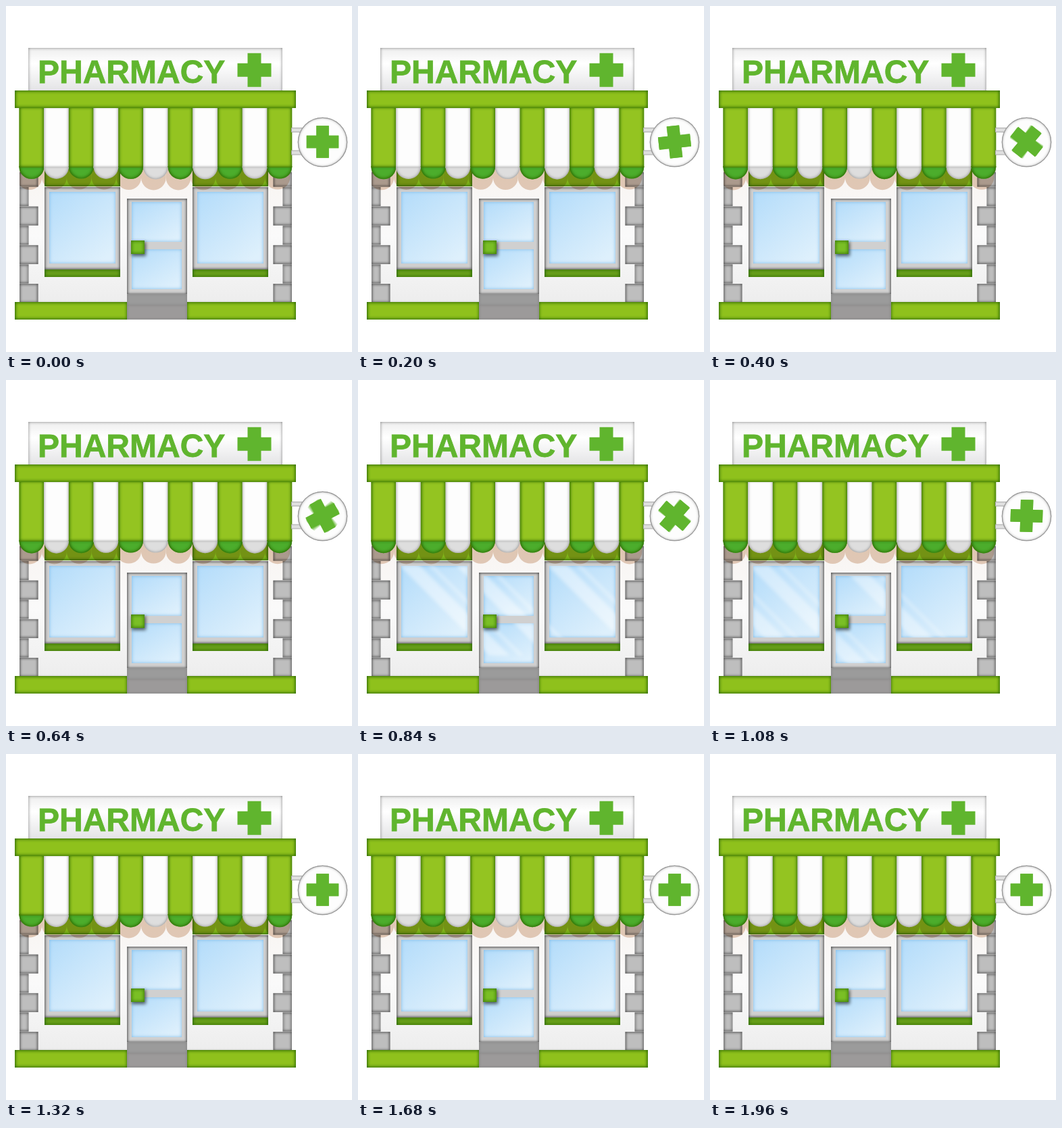
Animation of 512 by 512 pixels, one loop 2000 ms. Source, as an HTML page:

```html
<!DOCTYPE html>
<html lang="en">
<head>
<meta charset="utf-8">
<title>Pharmacy</title>
<style>
  html, body { margin: 0; width: 100%; height: 100%; overflow: hidden; background: #fff; }
  svg { display: block; width: 100vw; height: 100vh; }
  text { font: bold 48px "Liberation Sans", Arial, sans-serif; }
  #shadows { mix-blend-mode: multiply; }
</style>
</head>
<body>
<svg id="stage" viewBox="0 0 512 512">
  <defs>
    <linearGradient id="glass" x1="0" y1="0" x2=".75" y2="1">
      <stop offset="0" stop-color="#b3dcfa"/>
      <stop offset=".5" stop-color="#c9e6fb"/>
      <stop offset="1" stop-color="#def0fc"/>
    </linearGradient>
    <linearGradient id="board" x2="0" y2="1">
      <stop offset="0" stop-color="#eeeeee"/>
      <stop offset=".35" stop-color="#ffffff"/>
      <stop offset="1" stop-color="#e2e2e4"/>
    </linearGradient>
    <linearGradient id="wall" x2="0" y2="1">
      <stop offset="0" stop-color="#f8f4f1"/>
      <stop offset=".5" stop-color="#fafafa"/>
      <stop offset="1" stop-color="#ededed"/>
    </linearGradient>
    <filter id="soft" x="-50%" y="-50%" width="200%" height="200%">
      <feGaussianBlur stdDeviation="2.5"/>
    </filter>
    <clipPath id="wallArea"><path d="M20 240H423V440H20Z"/></clipPath>
    <clipPath id="panes"></clipPath>
  </defs>
  <g id="facade"></g>
  <g id="glare" clip-path="url(#panes)"></g>
  <g id="door"></g>
  <g id="shadows" clip-path="url(#wallArea)"></g>
  <g id="awning"></g>
  <g id="signs"></g>
  <g id="spinner"></g>
</svg>
<script>
const NS = "http://www.w3.org/2000/svg";
const $ = id => document.getElementById(id);
const LOOP = 2000, STEP = 40, SPIN = 1200;

function add(parent, tag, attrs) {
  const el = document.createElementNS(NS, tag);
  for (const key in attrs) el.setAttribute(key, attrs[key]);
  parent.appendChild(el);
  return el;
}

// Filter that darkens a shape softly along its inner edge.
function edgeFilter(id, color, blur, layers) {
  const f = add(document.querySelector("defs"), "filter",
    { id, x: "-10%", y: "-10%", width: "120%", height: "120%", "color-interpolation-filters": "sRGB" });
  add(f, "feFlood", { "flood-color": color });
  add(f, "feComposite", { in2: "SourceAlpha", operator: "out" });
  add(f, "feGaussianBlur", { stdDeviation: blur });
  add(f, "feComposite", { in2: "SourceAlpha", operator: "in", result: "edge" });
  const merge = add(f, "feMerge", {});
  add(merge, "feMergeNode", { in: "SourceGraphic" });
  for (let i = 0; i < layers; i++) add(merge, "feMergeNode", { in: "edge" });
}
edgeFilter("green", "#2c6a00", 2.4, 2);
edgeFilter("grey", "#555555", 1.9, 2);
edgeFilter("pale", "#808080", 2.2, 1);
edgeFilter("blue", "#7dbbe8", 2.4, 1);

const box = (parent, x, y, x2, y2, fill, edge) =>
  add(parent, "rect", { x, y, width: x2 - x, height: y2 - y, fill, filter: edge ? `url(#${edge})` : "none" });

const LIME = "#8fc11c", LEAF = "#60b52e";
const facade = $("facade"), door = $("door"), signs = $("signs");

function pane(x, y, x2, y2) {
  box(facade, x, y, x2, y2, "url(#glass)", "blue");
  box($("panes"), x, y, x2, y2, "#000");
}

box(facade, 20, 240, 423, 440, "url(#wall)", "pale");
for (let i = 0; i < 7; i++) {
  const top = i ? 239.5 + 28.6 * i : 246, bottom = 267.5 + 28.6 * i;
  const w = i % 2 ? 13.5 : 27.5;
  box(facade, 20, top, 20 + w, bottom, "#bebebe", "grey");
  box(facade, 423 - w, top, 423, bottom, "#bebebe", "grey");
}
for (const x of [57, 276]) {
  box(facade, x, 240, x + 112, 267, "#80b41a", "green");
  box(facade, x, 268, x + 112, 390, "#cfcfcf", "grey");
  pane(x + 7, 275, x + 105, 381);
  box(facade, x, 390, x + 112, 401, "#69a01a", "green");
}
box(facade, 179, 285, 268, 427, "#d0d0d0", "grey");
pane(186, 290, 260, 349);
pane(186, 360, 260, 419);

add(door, "rect", { x: 186, y: 349, width: 21, height: 21, opacity: .6, filter: "url(#soft)" });
box(door, 185, 347, 205, 367, "#7abf25", "green");
box(door, 13, 438, 180, 464, LIME, "green");
box(door, 267, 438, 429, 464, LIME, "green");
box(door, 179, 426, 268, 443, "#9b9b9b", "pale");
box(door, 179, 442, 268, 464, "#9c9a9a", "pale");

const STRIPES = 11, LEFT = 19.5, WIDTH = 36.7;
const scallops = [];
for (let i = 0; i < STRIPES; i++) {
  const x = LEFT + i * WIDTH, lime = i % 2 === 0;
  const edge = lime ? "green" : "pale";
  const shadow = add($("shadows"), "path", { fill: "#e6cfbd" });
  const flap = add($("awning"), "path", { fill: lime ? "#4cad2c" : "#dedede", filter: `url(#${edge})` });
  box($("awning"), x, 149, x + WIDTH, 239, lime ? "#94c421" : "#fdfdfd", edge);
  scallops.push({ x, flap, shadow });
}

const cross = (x, y, half, arm) =>
  `M${x - arm} ${y - half}h${2 * arm}v${half - arm}h${half - arm}v${2 * arm}h${arm - half}v${half - arm}` +
  `h${-2 * arm}v${arm - half}h${arm - half}v${-2 * arm}h${half - arm}Z`;

box(signs, 33, 62, 409, 128, "url(#board)", "pale");
add(signs, "text", { x: 47, y: 113.6, fill: LEAF, stroke: LEAF, "stroke-width": .8 }).textContent = "PHARMACY";
add(signs, "path", { d: cross(367.5, 94.7, 25, 10), fill: LEAF });
box(signs, 13, 125, 429, 151, LIME, "green");
for (const y of [180.5, 214])
  add(signs, "rect", { x: 422.5, y, width: 18, height: 6, fill: "#dedede", stroke: "#a8a8a8" });
add(signs, "circle", { cx: 468.5, cy: 201.5, r: 36.7, fill: "#fdfdfd", filter: "url(#pale)" });
add(signs, "circle", { cx: 468.5, cy: 201.5, r: 36.2, fill: "none", stroke: "#9a9a9a", "stroke-width": 1.3 });

// Stacked copies whose opacities average into motion blur.
const BLUR = 5;
const blades = Array.from({ length: BLUR }, (_, i) =>
  add($("spinner"), "path", { d: cross(0, 0, 23.7, 9.2), fill: LEAF, opacity: 1 / (i + 1) }));

// A soft pair of streaks for each window and the door.
const glares = [[113, 328], [223, 354], [332, 328]].map(([x, y]) => {
  const el = add($("glare"), "g", { fill: "#fff", filter: "url(#soft)" });
  add(el, "path", { d: "M-95 -80H-65L95 80H65Z", opacity: .5 });
  add(el, "path", { d: "M-52 -80H-44L116 80H108Z", opacity: .35 });
  return { x, y, el };
});

const clamp = v => Math.min(1, Math.max(0, v));
const easeInOut = p => p < .5 ? 4 * p ** 3 : 1 - 4 * (1 - p) ** 3;
const angleAt = ms => -360 * easeInOut(clamp(ms / SPIN));

function draw(t) {
  blades.forEach((blade, i) => {
    const angle = angleAt(t + (i - (BLUR - 1) / 2) * 4);
    blade.setAttribute("transform", `translate(468.5 201) rotate(${angle})`);
  });

  scallops.forEach(({ x, flap, shadow }, i) => {
    const sway = .5 * Math.sin(2 * Math.PI * t / LOOP - i * .8);
    const r = WIDTH / 2, drop = 18 + sway;
    flap.setAttribute("d", `M${x} 237h${WIDTH}v1a${r} ${drop} 0 0 1 ${-WIDTH} 0Z`);
    shadow.setAttribute("d", `M${x - 3} 240h${WIDTH}v14a${r} ${drop} 0 0 1 ${-WIDTH} 0Z`);
  });

  const sweep = clamp((t - 640) / 600);
  $("glare").setAttribute("opacity", Math.sin(Math.PI * sweep));
  for (const { x, y, el } of glares)
    el.setAttribute("transform", `translate(${x + 90 - 220 * sweep} ${y})`);
}

function tick() {
  const t = performance.now() % LOOP;
  draw(Math.floor(t / STEP) * STEP);
  requestAnimationFrame(tick);
}
tick();
</script>
</body>
</html>
```
